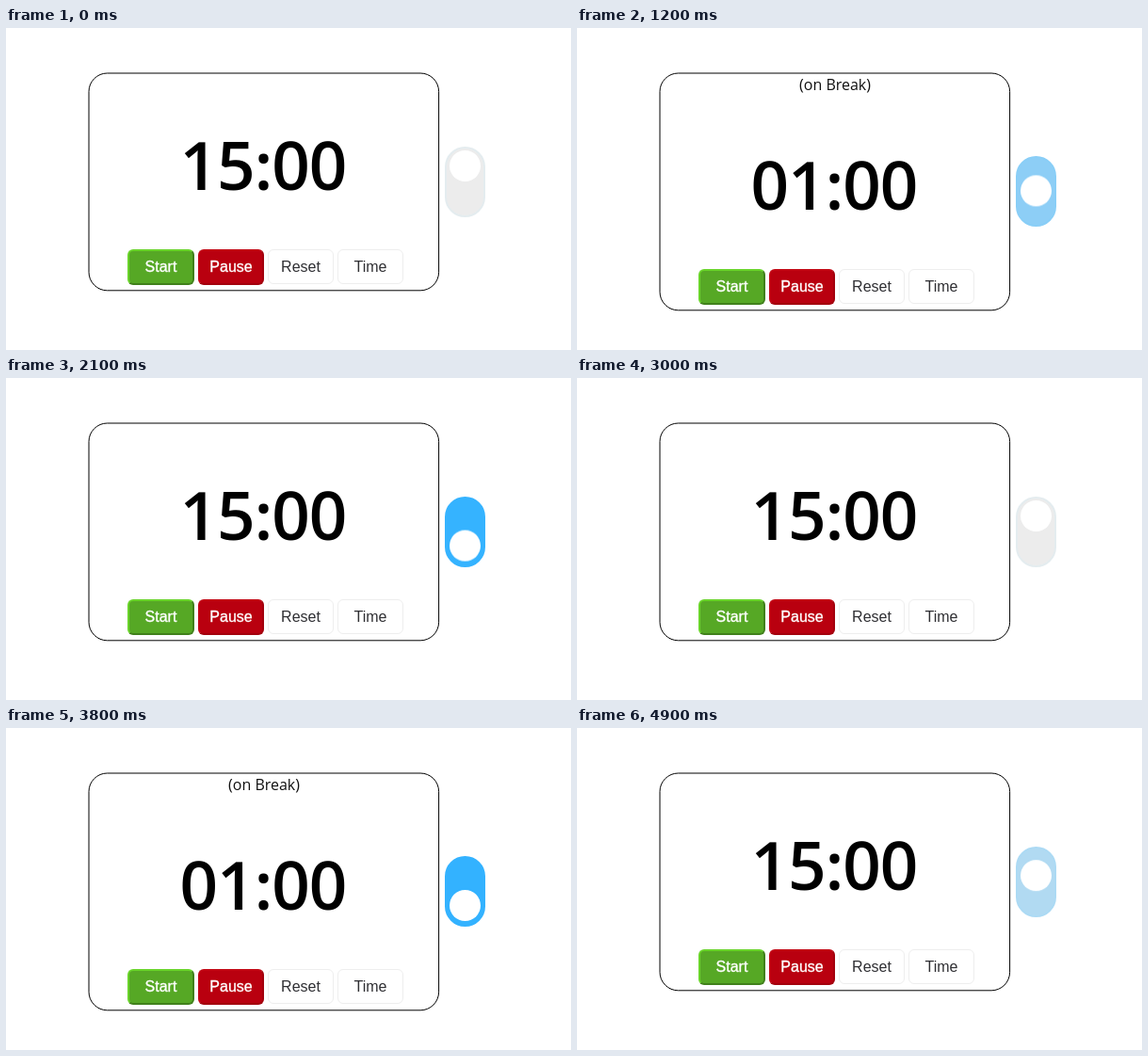
An HTML page for the animation above (5000 ms loop, 600x342 px).

```html
<!DOCTYPE html>
<html lang="en">
<head>
<meta charset="utf-8">
<title>Break timer</title>
<style>
  html, body { margin: 0; width: 100%; height: 100%; overflow: hidden; background: #fff; }
  #stage { position: relative; width: 600px; height: 342px; overflow: hidden; }
  #stage * { position: absolute; box-sizing: border-box; white-space: nowrap; }
  svg { left: 0; top: 0; overflow: visible; }
  #card { x: 88px; y: 48px; width: 371.6px; height: 230.8px; rx: 19.5px; fill: none; stroke: #000; }
  #note {
    left: 87px; top: 48px; width: 374px; text-align: center; visibility: hidden;
    font: 16px/24px "Open Sans", "Noto Sans", sans-serif; color: #111;
  }
  #body { left: 0; top: 0; width: 600px; height: 342px; }
  #digits { font: 600 71px "Open Sans", "Noto Sans", sans-serif; letter-spacing: -1px; }
  .btn {
    top: 235px; width: 70px; height: 37px; border: 1px solid #eee; border-radius: 6px;
    font: 16px/35px "Liberation Sans", Arial, sans-serif; text-align: center; color: #2f2f33;
  }
  .start, .pause {
    height: 37.6px; border-width: 2px; line-height: 33px; color: #fff;
    -webkit-text-stroke: 0.35px #fff;
  }
  .start { left: 129px; width: 71px; background: #56a825; border-color: #69d42a #40801b #40801b #69d42a; }
  .pause { left: 204px; background: #b9000f; border-color: #c20714 #a3000d #a3000d #c20714; }
  .reset { left: 278px; }
  .time { left: 352px; }
  #track { left: 466px; top: 126px; width: 43px; height: 75px; border: 2px solid; border-radius: 22px; }
  #knob { left: 3px; top: 2px; width: 33px; height: 33px; border-radius: 50%; background: #fff; }
  .break #card { height: 251.8px; }
  .break #note { visibility: visible; }
  .break #body { top: 21px; }
  .break #track { top: 136px; }
</style>
</head>
<body>
<div id="stage">
  <svg width="600" height="342"><rect id="card"/></svg>
  <div id="note">(on Break)</div>
  <div id="body">
    <svg width="600" height="342"><text id="digits" x="184.6" y="172">15:00</text></svg>
    <div class="btn start">Start</div>
    <div class="btn pause">Pause</div>
    <div class="btn reset">Reset</div>
    <div class="btn time">Time</div>
  </div>
  <div id="track"><div id="knob"></div></div>
</div>
<script>
  const LOOP = 5000, TICK = 100, FADE = 400;
  const flips = [1080, 2090, 3280, 4740]; // alternately into and out of the break
  const $ = id => document.getElementById(id);

  // Plays off/on poses with an eased change after every flip.
  function toggle(el, off, on) {
    const span = LOOP + FADE;
    const frames = [{ ...off, offset: 0 }];
    flips.forEach((at, i) => {
      const [from, to] = i % 2 ? [on, off] : [off, on];
      frames.push({ ...from, offset: at / span, easing: 'ease' });
      frames.push({ ...to, offset: (at + FADE) / span });
    });
    frames.push({ ...off, offset: 1 });
    const anim = el.animate(frames, { duration: span, fill: 'both' });
    anim.pause();
    return anim;
  }

  const anims = [
    toggle($('track'),
      { backgroundColor: '#ececec', borderColor: '#e4ecef' },
      { backgroundColor: '#33b2ff', borderColor: '#33b2ff' }),
    toggle($('knob'),
      { transform: 'translateY(0)' },
      { transform: 'translateY(32px)' })
  ];

  function render(ms) {
    const t = Math.floor(ms % LOOP / TICK) * TICK;
    const onBreak = flips.filter(at => at <= t).length % 2 === 1;
    $('stage').classList.toggle('break', onBreak);
    $('digits').textContent = onBreak ? '01:00' : '15:00';
    anims.forEach(a => { a.currentTime = t; });
  }

  const begin = performance.now();
  function loop() {
    render(performance.now() - begin);
    requestAnimationFrame(loop);
  }
  loop();
</script>
</body>
</html>
```
